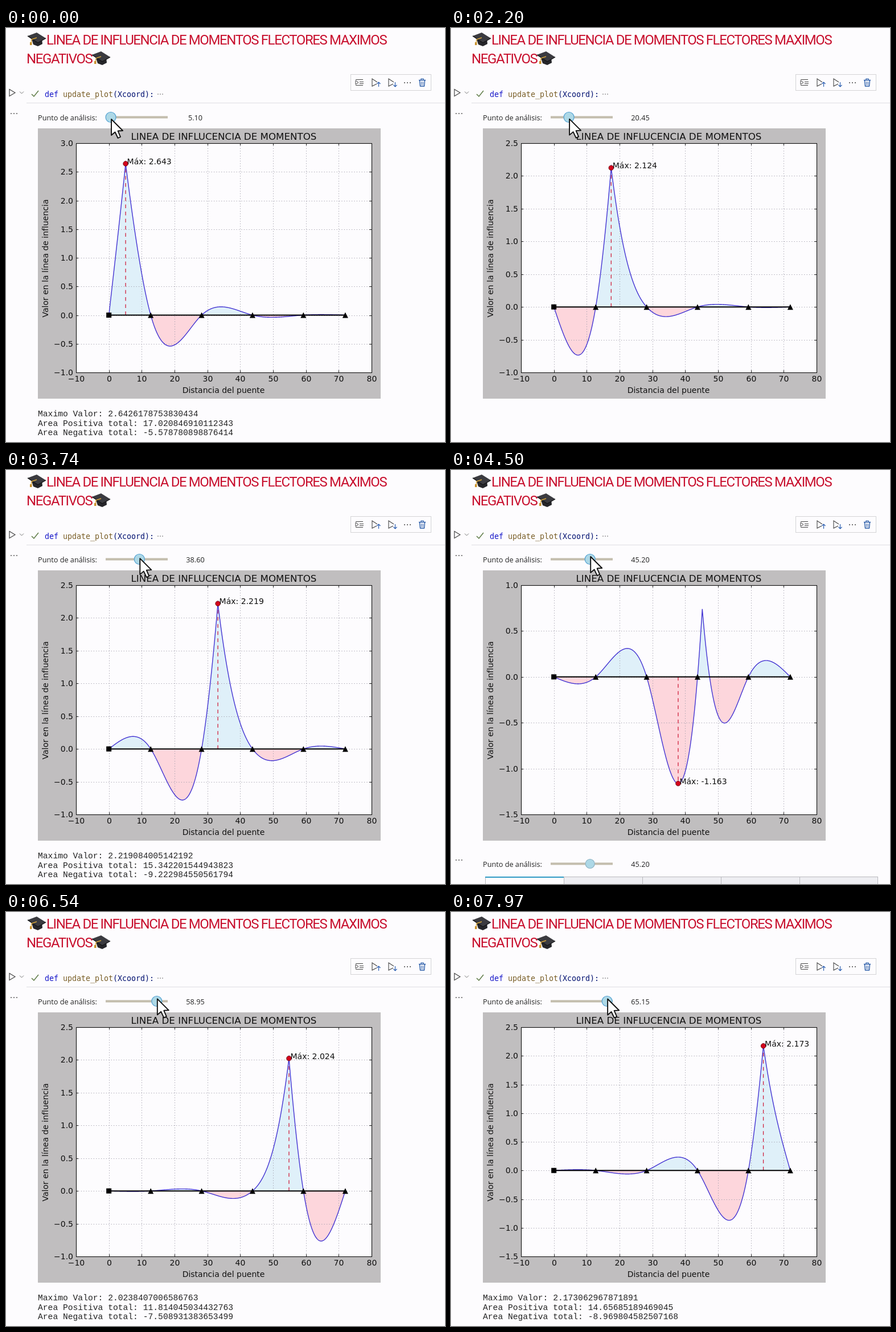
These frames come from a looping animation (771 px wide and 726 px high, 8000 ms). An HTML page with a canvas:

```html
<!DOCTYPE html>
<html lang="es">
<head>
<meta charset="utf-8">
<title>Línea de influencia</title>
<style>
html, body { margin: 0; width: 100%; height: 100%; overflow: hidden; background: #fdfcfe; }
canvas { display: block; }
</style>
</head>
<body>
<canvas id="stage" width="771" height="726"></canvas>
<script>
const ctx = document.getElementById('stage').getContext('2d');
const LOOP = 8000, REFRESH = 212.5, LAG = 250;
const UI = '"Open Sans", "Noto Sans", sans-serif';
const PLOT = '"DejaVu Sans", sans-serif';
const BOX = { l: 123, r: 642, t: 202, b: 604 };

// Slider value over time: [ms, value]
const DRAG = [[0, 5.1], [330, 5.1], [1025, 10.1], [1370, 12.85], [2725, 25.25], [3000, 28],
  [4200, 45.2], [4500, 45.2], [5062.5, 49.35], [5440, 52.1], [6125, 54.85], [6540, 58.95],
  [7612.5, 63.8], [7970, 65.15], [8000, 65.2]];

function lerpKeys(keys, t) {
  let i = 1;
  while (i < keys.length - 1 && keys[i][0] < t) i++;
  const [t0, a] = keys[i - 1], [t1, b] = keys[i];
  const k = Math.min(1, Math.max(0, (t - t0) / (t1 - t0)));
  return a + (b - a) * k;
}
const sliderAt = t => Math.round(lerpKeys(DRAG, t) * 20) / 20;

// --- Continuous beam, three-moment equations ---
const SUP = [0, 12.75, 28.25, 43.75, 59.25, 72];
const DX = 0.05, N = 1440;
const spanOf = x => {
  let s = 0;
  while (s < 4 && x > SUP[s + 1]) s++;
  return s;
};
const len = s => SUP[s + 1] - SUP[s];

// Moments over the supports for a unit load at x
function supportMoments(x) {
  const s = spanOf(x), L = len(s), a = x - SUP[s], b = L - a;
  const rhs = [0, 0, 0, 0, 0, 0], diag = [0, 0, 0, 0, 0, 0], m = [0, 0, 0, 0, 0, 0];
  rhs[s] -= a * b * (L + b) / L;
  rhs[s + 1] -= a * b * (L + a) / L;
  for (let i = 1; i <= 4; i++) {
    diag[i] = 2 * (len(i - 1) + len(i));
    if (i > 1) {
      const f = len(i - 1) / diag[i - 1];
      diag[i] -= f * len(i - 1);
      rhs[i] -= f * rhs[i - 1];
    }
  }
  for (let i = 4; i >= 1; i--) m[i] = (rhs[i] - (i < 4 ? len(i) * m[i + 1] : 0)) / diag[i];
  return m;
}
const MOMENTS = Array.from({ length: N + 1 }, (_, i) => supportMoments(i * DX));

let cached = null;
function influence(xi) {
  if (cached && cached.xi === xi) return cached;
  const s = spanOf(xi), L = len(s), a = xi - SUP[s];
  const y = MOMENTS.map((m, i) => {
    const u = i * DX - SUP[s];
    const free = u > 0 && u < L ? Math.min(u, a) * (L - Math.max(u, a)) / L : 0;
    return free + m[s] * (1 - a / L) + m[s + 1] * a / L;
  });
  let peak = 0, pos = 0, neg = 0;
  y.forEach((v, i) => {
    if (Math.abs(v) > Math.abs(y[peak])) peak = i;
    if (v > 0) pos += v * DX; else neg += v * DX;
  });
  const lo = Math.min(...y), hi = Math.max(...y), pad = (hi - lo) * 0.05;
  const raw = (hi - lo + 2 * pad) / 9;
  const step = [0.1, 0.2, 0.5, 1].find(v => v >= raw);
  const min = Math.floor((lo - pad) / step) * step, max = Math.ceil((hi + pad) / step) * step;
  return cached = { xi, y, peak, pos, neg, step, min, max };
}

// --- Drawing helpers ---
function text(str, x, y, font, color = '#111', align = 'left') {
  ctx.font = font;
  ctx.fillStyle = color;
  ctx.textAlign = align;
  ctx.fillText(str, x, y);
}
function path(pts, close) {
  ctx.beginPath();
  pts.forEach(([x, y], i) => i ? ctx.lineTo(x, y) : ctx.moveTo(x, y));
  if (close) ctx.closePath();
}
function line(pts, color, width = 1, close = false) {
  path(pts, close);
  ctx.strokeStyle = color;
  ctx.lineWidth = width;
  ctx.stroke();
}
function poly(pts, color) {
  path(pts, true);
  ctx.fillStyle = color;
  ctx.fill();
}
function rect(x, y, w, h, color) {
  ctx.fillStyle = color;
  ctx.fillRect(x, y, w, h);
}
function disc(x, y, r, fill, stroke, width = 1) {
  ctx.beginPath();
  ctx.arc(x, y, r, 0, 7);
  ctx.fillStyle = fill;
  ctx.fill();
  if (stroke) {
    ctx.strokeStyle = stroke;
    ctx.lineWidth = width;
    ctx.stroke();
  }
}
function dots(x, y, gap, color = '#555') {
  for (let i = -1; i < 2; i++) disc(x + i * gap, y, 1, color);
}
const shift = (pts, dx, dy) => pts.map(([x, y]) => [x + dx, y + dy]);

function gradCap(x, y) {
  poly(shift([[-9, 0], [9, -2], [10, 8], [2, 12], [-6, 9]], x, y), '#26262a');
  poly(shift([[-16, -6], [0, -12], [16, -2], [2, 6]], x, y), '#3b3b40');
  line(shift([[-16, -6], [2, 6], [16, -2]], x, y), '#151517', 1.4);
  line(shift([[0, -3], [-9, 0], [-10, 7]], x, y), '#d8a63a', 1.4);
  rect(x - 12, y + 5, 3.5, 5, '#c8922c');
}

function toolbar() {
  const ink = '#454545';
  rect(605, 81, 142, 29, '#d4d4d6');
  rect(606, 82, 140, 27, '#fdfcfe');
  for (const [x, y, w] of [[614, 91, 13], [621, 95, 7], [621, 98, 7], [614, 101, 13]]) {
    line([[x, y - 0.5], [x + w, y - 0.5]], ink);
  }
  line([[614, 92], [619, 95.5], [614, 99]], ink, 1, true);
  for (const [x, d] of [[643, -1], [672, 1]]) {
    line([[x + 8, 98], [x, 102], [x, 89], [x + 9, 95]], ink, 1.1);
    line([[x + 11.5, 95], [x + 11.5, 103]], '#2a5db0', 1.2);
    const tip = 99 + d * 4;
    line([[x + 8.5, tip - d * 3], [x + 11.5, tip], [x + 14.5, tip - d * 3]], '#2a5db0', 1.2);
  }
  dots(705, 96, 5, ink);
  const blue = '#2458a6';
  line([[725, 91.5], [737, 91.5]], blue, 1.4);
  line([[729, 91], [729, 89], [733, 89], [733, 91]], blue, 1.2);
  line([[726.5, 92], [727.5, 102], [734.5, 102], [735.5, 92]], blue, 1.4);
  line([[729.7, 94], [729.7, 100]], blue);
  line([[732.3, 94], [732.3, 100]], blue);
}

function heading() {
  const font = '24px Roboto, "Open Sans", sans-serif', red = '#c8102e';
  gradCap(54, 20);
  ctx.letterSpacing = '-1.4px';
  text('LINEA DE INFLUENCIA DE MOMENTOS FLECTORES MAXIMOS', 71, 28.5, font, red);
  text('NEGATIVOS', 36, 61.5, font, red);
  ctx.letterSpacing = '0px';
  gradCap(167, 53);
}

function codeCell() {
  const mono = '13.3px "DejaVu Sans Mono", monospace';
  line([[6, 107.5], [16, 113.5], [6, 119.5]], '#444', 1.2, true);
  line([[24, 111.5], [27.5, 115], [31, 111.5]], '#777', 1);
  line([[45, 116], [49, 120], [57, 110]], '#5d7a45', 1.5);
  text('def', 68, 121, mono, '#1414c8');
  text('update_plot', 100, 121, mono, '#795e26');
  text('(Xcoord):', 188, 121, mono, '#001070');
  dots(271, 116, 4, '#999');
  rect(36, 131, 735, 1, '#dedee2');
}

function slider(y, v, r, edge) {
  dots(14, y - 6.5, 5);
  text('Punto de análisis:', 56, y + 5.5, '12.7px ' + UI, '#222');
  rect(175, y - 2, 109, 4, '#c3bdad');
  disc(176.4 + v * 1.5, y, r, '#add8e6', edge, 1.2);
  text(v.toFixed(2), 332.5, y + 5.5, '12.7px ' + UI, '#222', 'center');
}

function figure(d) {
  const { l, r, t, b } = BOX, font = '14px ' + PLOT;
  const px = x => l + (x + 10) * (r - l) / 90;
  const py = y => b - (y - d.min) * (b - t) / (d.max - d.min);
  const zero = py(0);

  rect(56, 176, 602, 474, '#c0bebf');
  rect(l, t, r - l, b - t, '#fdfcfe');

  const curve = d.y.map((v, i) => [px(i * DX), py(v)]);
  for (const [top, h, color] of [[t, zero - t, '#dff0f9'], [zero, b - zero, '#fdd6dc']]) {
    ctx.save();
    ctx.beginPath();
    ctx.rect(l, top, r - l, h);
    ctx.clip();
    poly([[px(0), zero], ...curve, [px(72), zero]], color);
    ctx.restore();
  }

  const ticks = Math.round((d.max - d.min) / d.step);
  const grid = pts => {
    ctx.setLineDash([1.2, 3.2]);
    line(pts, '#9d9aa8', 1);
    ctx.setLineDash([]);
  };
  for (let x = -10; x <= 80; x += 10) {
    const gx = Math.round(px(x)) + 0.5;
    if (x > -10 && x < 80) grid([[gx, t], [gx, b]]);
    line([[gx, t], [gx, t + 4]], '#222');
    line([[gx, b], [gx, b - 4]], '#222');
    text(String(x).replace('-', '−'), gx, 620, font, '#111', 'center');
  }
  for (let i = 0; i <= ticks; i++) {
    const v = d.min + i * d.step, gy = Math.round(py(v)) + 0.5;
    if (i && i < ticks) grid([[l, gy], [r, gy]]);
    line([[l, gy], [l + 4, gy]], '#222');
    line([[r, gy], [r - 4, gy]], '#222');
    const label = (Math.abs(v) < 1e-9 ? 0 : v).toFixed(1).replace('-', '−');
    text(label, 118, gy + 4.5, font, '#111', 'right');
  }

  const mx = px(d.peak * DX), my = py(d.y[d.peak]);
  ctx.setLineDash([6.5, 6]);
  line([[mx, zero], [mx, my]], '#d0203c', 1.3);
  ctx.setLineDash([]);
  line(curve, '#4434d2', 1.4);
  line([[px(0), zero], [px(72), zero]], '#000', 2);
  rect(px(0) - 4.5, zero - 4.5, 9, 9, '#000');
  for (const s of SUP.slice(1)) {
    const x = px(s);
    poly([[x, zero - 5], [x + 5, zero + 5], [x - 5, zero + 5]], '#000');
  }
  disc(mx, my, 4.3, '#d4041c', '#5a0a14', 0.8);
  ctx.strokeStyle = '#111';
  ctx.lineWidth = 1.1;
  ctx.strokeRect(l + 0.5, t + 0.5, r - l, b - t);

  text('Máx: ' + d.y[d.peak].toFixed(3), mx + 2.5, my + 1, font);
  text('LINEA DE INFLUCENCIA DE MOMENTOS', 382.5, 196, '16.7px ' + PLOT, '#111', 'center');
  text('Distancia del puente', 382, 640, font, '#111', 'center');
  ctx.save();
  ctx.translate(74, 404);
  ctx.rotate(-Math.PI / 2);
  text('Valor en la línea de influencia', 0, 0, font, '#111', 'center');
  ctx.restore();
}

function printed(d) {
  const font = '14.67px "Liberation Mono", monospace';
  [
    'Maximo Valor: ' + d.y[d.peak],
    'Area Positiva total: ' + d.pos,
    'Area Negativa total: ' + d.neg
  ].forEach((s, i) => text(s, 56, 681 + i * 16.6, font, '#222'));
}

function nextCell(v) {
  slider(690.5, v, 8, '#8fb3c4');
  for (let i = 0; i < 5; i++) {
    const x = 60 + i * 138;
    rect(x, 713, 138, 13, '#b9b9bd');
    rect(x + 1, 714, i < 4 ? 137 : 136, 12, i ? '#eeeef2' : '#fdfcfe');
  }
  rect(60, 713, 138, 2, '#2f9ac4');
}

function pointer(x, y) {
  const arrow = [[0, 0], [0, 28], [6.5, 22.5], [11.5, 33], [16, 31], [11.5, 20.5], [20, 20]];
  ctx.lineJoin = 'round';
  poly(shift(arrow, x, y), '#fff');
  line(shift(arrow, x, y), '#111', 1.9, true);
  ctx.lineJoin = 'miter';
}

function draw(t) {
  const v = sliderAt(t);
  const turn = Math.floor(t / REFRESH), age = t - turn * REFRESH;
  const d = influence(sliderAt(turn * REFRESH - LAG));

  rect(0, 0, 771, 726, '#fdfcfe');
  heading();
  toolbar();
  codeCell();
  slider(156.5, v, 9, '#4f9fd2');
  figure(d);
  // Output is cleared on each refresh, so the next cell briefly moves up
  if (turn === 0 || age > 101) printed(d);
  else if (age < 60) nextCell(v);
  pointer(177.4 + v * 1.5, lerpKeys([[0, 160], [3100, 159.5], [4200, 152], [8000, 152.5]], t));
}

function frame() {
  draw(performance.now() % LOOP);
  requestAnimationFrame(frame);
}
frame();
</script>
</body>
</html>
```
